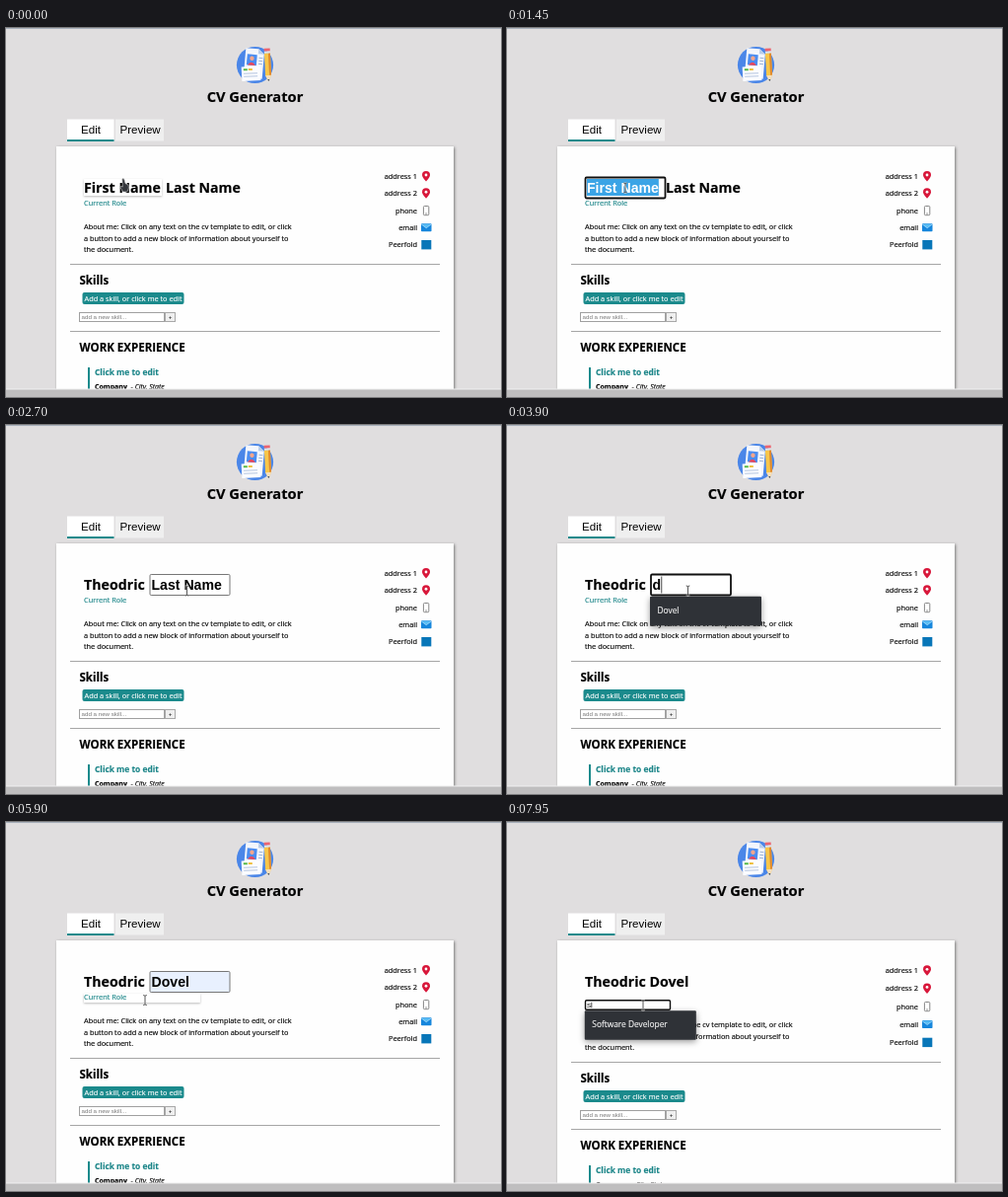
Animation of 502x374 px, one loop 8000 ms. Source, as an HTML page:

```html
<!DOCTYPE html>
<html lang="en">
<head>
<meta charset="utf-8">
<title>CV Generator</title>
<style>
  html, body { margin: 0; width: 100%; height: 100%; overflow: hidden; background: #e0dedf; }
  svg { display: block; width: 502px; height: 374px; }
  text { font: 7.36px "Open Sans", "Noto Sans", sans-serif; color: #000; fill: currentColor; stroke: currentColor; stroke-width: .15; white-space: pre; }
  .title { font-size: 14.7px; font-weight: 700; }
  .name { font-size: 14.2px; font-weight: 700; }
  .head { font-size: 11.5px; font-weight: 700; }
  .job { font-size: 8.4px; font-weight: 700; }
  .tab { font: 11.6px "Liberation Sans", Arial, sans-serif; stroke: none; }
  .big { font: 700 14.1px "Liberation Sans", Arial, sans-serif; stroke: none; }
  .small { font: 6.2px "Liberation Sans", Arial, sans-serif; stroke: none; }
  .option { font-size: 8.35px; color: #f4f4f4; }
  .teal { color: #1b8588; }
  .hint { color: #777; }
  .white { color: #fff; fill: #fff; }
  .end { text-anchor: end; }
  .card { filter: drop-shadow(1px 1px 1.5px #777); }
  .raised { fill: #fff; filter: drop-shadow(.5px 1px 1px #bbb); }
  .menu { filter: drop-shadow(0 2px 3px #0006); }
</style>
</head>
<body>
<svg viewBox="0 0 502 374">
  <rect width="502" height="374" fill="#e0dedf"/>
  <rect width="502" height="1" fill="#a8b1bc"/>

  <circle cx="252.5" cy="37.5" r="18.6" fill="#4a86e8"/>
  <g transform="rotate(5 252 36)">
    <path d="M242 21h13l6 5v25h-19z" fill="#f3f6fc"/>
    <path d="M255 21v5h6z" fill="#b9cdea"/>
    <rect x="244" y="27" width="10" height="11" fill="#4b8df0"/>
    <circle cx="249" cy="31" r="2.2" fill="#f5a58c"/>
    <path d="M245 38q4-6 8 0z" fill="#e8475c"/>
    <path d="M256 30h4m-4 3h4m-4 3h4" stroke="#9fb4d6"/>
  </g>
  <g transform="rotate(-3 248 46)">
    <rect x="239" y="39" width="19" height="14.5" fill="#fbfcff"/>
    <path d="M241 42h4" stroke="#55b848" stroke-width="2"/>
    <path d="M246 42h4" stroke="#f0c040" stroke-width="2"/>
    <path d="M241 46h14m-14 3h14" stroke="#b5c5df"/>
  </g>
  <g transform="rotate(-3 266 37)">
    <path d="M262.5 25h6v23l-3 6-3-6z" fill="#f8c64a"/>
    <path d="M266.5 25h2v23h-2z" fill="#e08a2f"/>
    <path d="M262.5 48h6l-3 6z" fill="#f5dfbe"/>
    <path d="M262.5 20.5h6v3h-6z" fill="#ec6470"/>
    <path d="M262.5 23.5h6v2h-6z" fill="#dce5ee"/>
    <path d="M264.5 52h2l-1 2z" fill="#354764"/>
  </g>
  <text x="252.5" y="75" class="title" text-anchor="middle">CV Generator</text>

  <rect class="card" x="51" y="120" width="403" height="260" fill="#fefefe"/>
  <rect x="62" y="92.5" width="47.5" height="22" fill="#fff"/>
  <rect x="62" y="113" width="47.5" height="2" fill="#1b8a8c"/>
  <rect x="111" y="92.5" width="49" height="22" fill="#efefef"/>
  <text x="76" y="107" class="tab">Edit</text>
  <text x="115.5" y="107" class="tab">Preview</text>

  <g id="page">
    <text x="79" y="204.3">About me: Click on any text on the cv template to edit, or click</text>
    <text x="79" y="215.5">a button to add a new block of information about yourself to</text>
    <text x="79" y="226.7">the document.</text>
    <path d="M65 239.5H440M65 307.5H440" stroke="#a6a6a6"/>
    <text x="74.5" y="259.5" class="head">Skills</text>
    <rect x="77.5" y="268" width="103" height="12" rx="2" fill="#1b8a8c"/>
    <text x="79.5" y="276.6" class="white">Add a skill, or click me to edit</text>
    <rect x="74.5" y="288.5" width="86" height="9" fill="#fff" stroke="#a0a0a0"/>
    <text x="76.5" y="295" class="small hint">add a new skill...</text>
    <rect x="161.5" y="288.5" width="10" height="9" fill="#efefef" stroke="#a8a8a8"/>
    <text x="164.8" y="295.2" class="small">+</text>
    <text x="74.5" y="328" class="head">WORK EXPERIENCE</text>
    <rect x="83" y="344" width="2" height="36" fill="#1b8a8c"/>
    <text x="90" y="352" class="job teal">Click me to edit</text>
    <text x="90" y="366.3" style="font-size:7px"><tspan font-weight="700">Company</tspan>  - <tspan font-style="italic">City, State</tspan></text>
  </g>
  <g id="live"></g>
  <rect y="366" width="502" height="8" fill="#bfbebf"/>
  <rect y="365.5" width="502" height="1" fill="#f2f2f2"/>
</svg>

<script>
const LOOP = 8000, FIRST = 'Theodric', LAST = 'Dovel';
const ROLE_OPEN = 6200;
const page = document.getElementById('page');
const live = document.getElementById('live');
const pen = document.createElement('canvas').getContext('2d');
const fonts = {
  big: '700 14.1px "Liberation Sans", Arial, sans-serif',
  small: '6.2px "Liberation Sans", Arial, sans-serif'
};

const clamp = v => Math.max(0, Math.min(1, v));
const between = (t, a, b) => t >= a && t < b;
const label = (x, y, s, cls = '') => `<text x="${x}" y="${y}" class="${cls}">${s}</text>`;
const rect = (x, y, w, h, attrs) => `<rect x="${x}" y="${y}" width="${w}" height="${h}" ${attrs}/>`;
const raised = (x, y, w, h) => rect(x, y, w, h, 'class="raised"');
const measure = (s, cls) => {
  pen.font = fonts[cls];
  return pen.measureText(s).width;
};

// Text box; characters from index `sel` on are highlighted.
function field(x, y, w, h, value, { cls = 'big', focus, filled, sel = value.length, caret }) {
  const big = cls === 'big', tx = x + 2, base = y + h - (big ? 5.8 : 2.7);
  const end = tx + measure(value, cls);
  const mark = tx + measure(value.slice(0, sel), cls);
  const ring = focus ? (big ? 1.8 : 1.4) : 1;
  let out = rect(x + .5, y + .5, w - 1, h - 1,
    `rx="1.2" fill="${filled ? '#e8f0fe' : '#fff'}" stroke="${focus ? '#101010' : '#777'}" stroke-width="${ring}"`);
  if (sel < value.length)
    out += rect(mark, y + 2, end - mark, h - (big ? 5 : 4), 'fill="#3ba4e6"');
  out += label(tx, base, `${value.slice(0, sel)}<tspan class="white">${value.slice(sel)}</tspan>`, cls);
  if (caret) out += rect(end + .3, y + 2.5, .8, h - 5, 'fill="#222"');
  return out;
}

function menu(x, y, option, opacity, hot) {
  return `<g class="menu" opacity="${opacity}">` +
    rect(x, y, 113, 29.5, 'rx="1" fill="#2f3237"') +
    (hot ? rect(x, y + 3, 113, 23.5, 'fill="#3aa8e8"') : '') +
    label(x + 7.5, y + 17, option, 'option') + '</g>';
}

// Life of a name box: focused, selected, typed into, completed from the menu, left.
function nameBox(t, x, hint, name, [focus, select, type, hover, pick, blur]) {
  const typing = between(t, type, hover), preview = between(t, hover, pick);
  const value = t < type ? hint : typing ? name[0].toLowerCase() : name;
  const box = field(x, 151, 82, 22, preview ? '' : value, {
    focus: between(t, focus, blur),
    filled: t >= hover,
    sel: between(t, select, type) ? 0 : undefined,
    caret: between(t, focus, select) || typing || between(t, pick, blur)
  });
  return box + (preview ? label(x + 2, 166, name, 'small') : '') +
    (typing || preview ? menu(x - .5, 173.8, name, clamp((t - type) / 250), preview) : '');
}

function names(t) {
  if (t < 500) return raised(79, 153, 79, 17) + label(79, 167, 'First Name', 'name') + label(162, 167, 'Last Name', 'name');
  if (t < 2600) return (t >= 2450 ? raised(161, 153, 77, 17) : '') + label(161, 167, 'Last Name', 'name') +
    nameBox(t, 79, 'First Name', FIRST, [950, 1200, 1550, 1850, 2150, 2400]);
  if (t < ROLE_OPEN) return label(79, 167, FIRST, 'name') +
    nameBox(t, 145.5, 'Last Name', LAST, [2950, 3150, 3650, 4350, 5000, 5450]);
  return label(79, 167, `${FIRST} ${LAST}`, 'name');
}

function role(t) {
  if (t < ROLE_OPEN)
    return (t >= 5700 ? raised(79, 174, 118, 9) : '') + label(79, 180.3, 'Current Role', 'teal');
  const typed = t >= 7750;
  return field(79, 180.3, 87, 10.4, typed ? 'S' : 'Current Role', {
    cls: 'small',
    focus: t >= 6550,
    sel: typed || t < 6950 ? undefined : t < 7250 ? 8 : 0,
    caret: typed || between(t, 6550, 6950)
  }) + (typed ? menu(78.8, 191.3, 'Software Developer', clamp((t - 7700) / 250), false) : '');
}

const pin = '<path d="M426 155.5Q422 151 422 149a4 4 0 0 1 8 0Q430 151 426 155.5z" fill="#d8173a"/><circle cx="426" cy="149" r="1.4" fill="#fff"/>';
const contacts = [
  ['address 1', pin],
  ['address 2', pin],
  ['phone', '<rect x="423.4" y="146" width="5.4" height="9.2" rx="1" fill="#fff" stroke="#858585"/><path d="M425 153.5h2" stroke="#858585" stroke-width=".8"/>'],
  ['email', '<rect x="421" y="146.5" width="10.5" height="8" rx=".8" fill="#1686dc"/><path d="M421 147l5.2 4 5.3-4" fill="#58bdf5" stroke="#c9ebff" stroke-width=".6"/>'],
  ['Peerfold', '<rect x="421.3" y="146" width="10" height="9.4" fill="#0876b8"/>']
];

const contactList = open => contacts.map(([name, icon], i) => {
  const dy = i * 17.25 + (open ? .3 + i * .85 : 0);
  return `<g transform="translate(0 ${dy})">${label(417, 153, name, 'end')}${icon}</g>`;
}).join('');

// Pointer stops: time, x, y.
const stops = [
  [0, 119, 153], [150, 119, 153], [500, 120, 162], [1600, 120, 162], [1850, 123, 181], [2150, 123, 181],
  [2450, 183, 162], [2600, 183.5, 168], [4200, 183.5, 168], [4450, 187, 181], [5050, 187, 181],
  [5700, 141, 181], [5950, 141, 180.5], [6250, 138, 186], [LOOP, 138, 186]
];

const beam = 'M-1.8-5Q0-5 0-4V4Q0 5-1.8 5M1.8-5Q0-5 0-4M0 4Q0 5 1.8 5';

function pointer(t) {
  const i = stops.findIndex(s => s[0] > t), a = stops[i - 1], b = stops[i];
  const u = (t - a[0]) / (b[0] - a[0]), k = u * u * (3 - 2 * u);
  const x = a[1] + (b[1] - a[1]) * k, y = a[2] + (b[2] - a[2]) * k;
  const hand = t < 500 || between(t, 1800, 2250) || between(t, 4350, 5150);
  const shape = hand
    ? '<path d="M-1.2 0Q0-1 1 .5L2 4.5 5 6 5.5 9 4 13H-.5L-3 8.5-2.5 7.5-.7 8z" fill="#34373c" stroke="#c8c8c8" stroke-width=".6"/>'
    : `<path d="${beam}" fill="none" stroke="#fff" stroke-width="2" opacity=".5"/>` +
      `<path d="${beam}" fill="none" stroke="#444" stroke-width=".9"/>`;
  return `<g transform="translate(${x} ${y})">${shape}</g>`;
}

let shown = '';
function frame(now) {
  const t = now % LOOP, open = t >= ROLE_OPEN;
  page.setAttribute('transform', `translate(0 ${open ? 4 : 0})`);
  const scene = contactList(open) + role(t) + names(t) + pointer(t);
  if (scene !== shown) live.innerHTML = shown = scene;
  requestAnimationFrame(frame);
}
frame(0);
</script>
</body>
</html>
```
